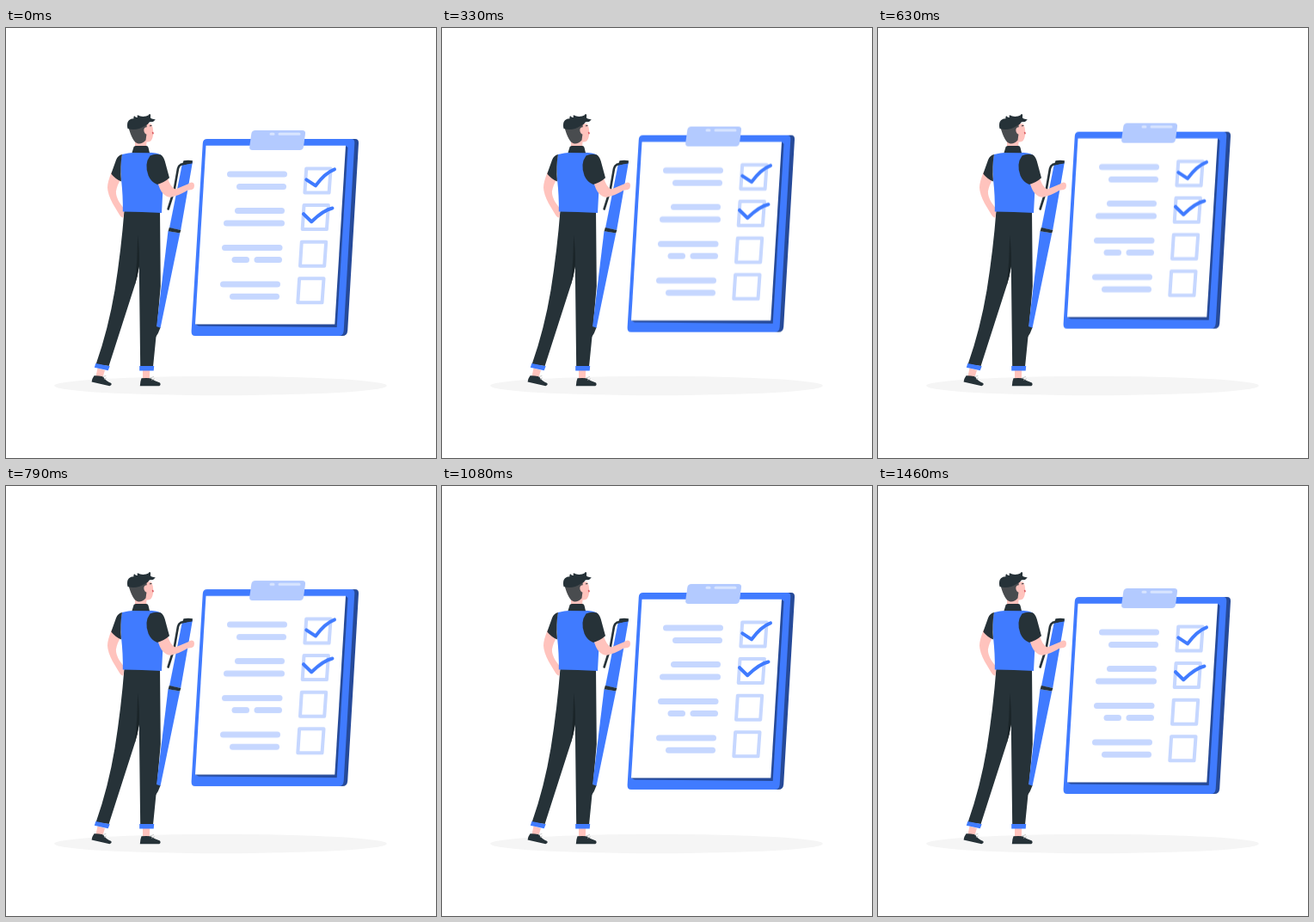
Write an HTML page that moves like this. It is 500 px wide and 500 px high and loops after 1.5 s.

```html
<!DOCTYPE html>
<html lang="en">
<head>
<meta charset="utf-8">
<title>Checklist</title>
<style>
  html, body { margin: 0; width: 100%; height: 100%; overflow: hidden; background: #fff; }
  svg { display: block; width: 100%; height: 100%; }
  .blue { fill: #407bff; }
  .dark { fill: #263238; }
  .skin { fill: #ffc3bd; }
  .line { fill: none; stroke-linecap: round; stroke-linejoin: round; }
  #rows { stroke: #c6d7ff; stroke-width: 7; }
  #boxes { stroke: #c6d7ff; stroke-width: 4; }
  #checks { stroke: #407bff; stroke-width: 4; }
</style>
</head>
<body>
<svg viewBox="0 0 500 500">
  <ellipse cx="249.5" cy="416" rx="193.5" ry="11.2" fill="#f5f5f5"/>

  <g id="board">
    <path fill="#264a99" d="M239 129H406Q410.300 129 410 134L397.200 352Q396.700 358 391 358H225Z"/>
    <path class="blue" d="M234 129H401.500Q405.600 129 405.300 134L392.700 352Q392.200 358 387 358H220Q215.300 358 215.600 352.500L228.800 134Q229.100 129 234 129Z"/>
    <path fill="#264a99" d="M395 137L397.500 139L384.700 348L224 346.500L220 344.600Z"/>
    <path fill="#fff" d="M232.500 136.800H395L382.300 344.600H220Z"/>
    <path fill="#b3caff" d="M290 119H344.500Q348.500 119 348 123L346 138Q345.400 142 341.500 142H286.500Q282.700 142 283.200 138L285.300 123Q285.900 119 290 119Z"/>
    <path class="line" stroke="#d9e5ff" stroke-width="3" d="M308 123.200H311M318 123.200H341"/>
    <g id="rows" class="line"></g>
    <g id="boxes" class="line"></g>
    <g id="checks" class="line">
      <path d="M349.300 176.300L360 183.400Q371 168.500 382 164.400"/>
      <path d="M346 216.200L355.200 225.200Q369.500 211.500 379.500 209.500"/>
    </g>
  </g>

  <g id="legs">
    <path class="skin" d="M106.500 395.500L115 398L112.500 406L104.500 405ZM159 397H167.200L166.800 409H159Z"/>
    <path class="dark" d="M102.500 404.200Q107 404 112.800 405.200Q116.500 411 122.300 413Q123.500 415.200 120.500 416.200L99.600 411.500Q100 407.500 102.500 404.200ZM157.500 407.300Q163 406.800 168.300 407.300Q173 411 179 412.500Q180.500 415 178.300 416.300H155.800Q156 411 157.500 407.300Z"/>
    <path class="line" stroke="#c7c7c7" stroke-width="1" d="M112.800 405.500L116 404.500M114.300 408L116.500 407M167.800 407L171.500 405.500M169.500 409L172.500 408"/>
    <path class="dark" d="M137.500 212H179L179.800 300Q176.500 340 171 394H156.200L154.800 277Q153 289 149.800 299L119.600 393L104.600 391Q119 350 126.500 305Q134 258 137.500 212Z"/>
    <path fill="#1b2529" d="M153.200 241Q155.600 262 154.800 277Q153 289 149.800 299Q153 270 153.200 241Z"/>
    <path class="blue" d="M104.300 390L120.700 393.200L118.700 398.200L102.800 394.700ZM155.200 393H172.200L171.700 398.600H155.200Z"/>
  </g>

  <g id="pen">
    <path class="blue" d="M205 157.500L217 155.500L203.200 235L190 232.500Z"/>
    <path class="blue" d="M188.500 236L202.300 238.500L179.500 349L175 347.500Z"/>
    <path class="dark" d="M189.800 232L203.400 235L202.200 238.600L188.700 236.300Z"/>
    <path class="dark" d="M206.500 154.300Q212 153.300 217 154.300L216.500 157.500L204.800 159.300Z"/>
    <path class="dark" d="M174.800 347L179.500 348.500Q177.500 355 172.800 361.500Z"/>
    <path class="line" stroke="#263238" stroke-width="2.600" d="M209 157.500L203.200 158.800Q200.800 160 200 163.500L195.600 188.500L188.600 210.500"/>
  </g>

  <path class="skin" d="M123 167Q118 179 118 185.500Q118.200 193 124 204L131.500 216.500Q134 220.800 136.500 220.500L137.500 210.500L132 203Q127.700 196 127.900 190Q129 183 134 175Z"/>
  <path class="blue" d="M135 147Q142 145 150 144.800H166Q175 145 180 147.500L182.300 190L181 215Q158 213.800 135.800 213.600Q136.200 196 134 176Q132.500 158 135 147Z"/>
  <path class="dark" d="M135 147Q130 148 128 153.500L122.300 169.500Q127 175.500 134 178.500Q132.500 160 135 147Z"/>

  <g id="head">
    <path class="skin" d="M150 128L162 111L169 111.500Q171.300 116 171.300 121Q171.200 128 168.500 131.200Q166 133 163.500 132.500L163 140H150Z"/>
    <path fill="#494c4f" d="M142.300 115Q150 119 163.500 112L164 118Q163.500 124 162.500 130.500Q158.500 135 153 134.300Q147 132.500 142.300 115Z"/>
    <path class="skin" d="M164.500 115.200Q160.200 114.800 160.300 119Q160.800 123.500 164.500 123.800Z"/>
    <path class="dark" d="M141.500 117Q139.800 110.500 143 107.200Q145 105.200 148.500 105.200Q147.800 103.200 149.300 102.300Q151 104.500 153 103.700Q151.800 102.200 153.200 101.200Q157 103.700 163 102.500Q166 102 167 99.700Q168.800 100.500 168 103Q167.200 104.700 169.500 105.500Q172 106.200 173.800 106.500Q171.500 109.800 167 109.200Q165.500 112 161.500 113.700Q152 120 141.500 117Z"/>
    <path class="line" stroke="#263238" stroke-width="1" d="M167.300 113.800L169 113.600"/>
    <path class="line" stroke="#d95b62" stroke-width="1.600" d="M170.600 121.600L171 122.600"/>
    <path class="dark" d="M146.500 145L148.500 138.500Q149 137 151 137H163Q165 137.200 165.500 139L167 145.200Z"/>
  </g>

  <path class="skin" d="M176 178Q178.500 188 182.500 192.500Q187 197 192 196.700Q202 194.500 211.500 188.500Q216.500 188.800 218.300 186.500Q219.800 182.500 218 180.300Q215.500 178.300 212 181.200L197 187.500Q191.500 186 187.500 173Z"/>
  <path class="dark" d="M167.500 148.500Q173 145.500 179.500 147.300Q183 148.800 184.800 155L190 174.200Q184.500 179.300 175.800 182Q168.500 179 165.500 171.500Q160.500 158 167.500 148.500Z"/>
</svg>
<script>
  const $ = id => document.getElementById(id);
  const addPath = (parent, d) => {
    const path = document.createElementNS("http://www.w3.org/2000/svg", "path");
    path.setAttribute("d", d);
    parent.append(path);
  };

  // Text bars: left, right, y
  const bars = [
    [257, 327, 170], [268, 326, 184.5],
    [266, 324, 212.6], [253, 324, 227],
    [251, 321.5, 255.4], [262.5, 283, 269.5], [288.5, 321, 269.5],
    [249, 319, 298], [260, 318, 312.2]
  ];
  for (const [x1, x2, y] of bars) addPath($("rows"), `M${x1 + 3.5} ${y}H${x2 - 3.5}`);

  for (let i = 0; i < 4; i++) {
    const x = 349.2 - 2.7 * i, y = 163.5 + 42.6 * i;
    addPath($("boxes"), `M${x} ${y}h28.4l-2 28h-28.2Z`);
  }

  // Constant-speed rise and fall
  const shift = y => ({ transform: `translateY(${y}px)` });
  $("board").animate([shift(0.27), shift(-9.73), shift(0.27)],
    { duration: 1500, delay: -20, iterations: Infinity });
</script>
</body>
</html>
```
